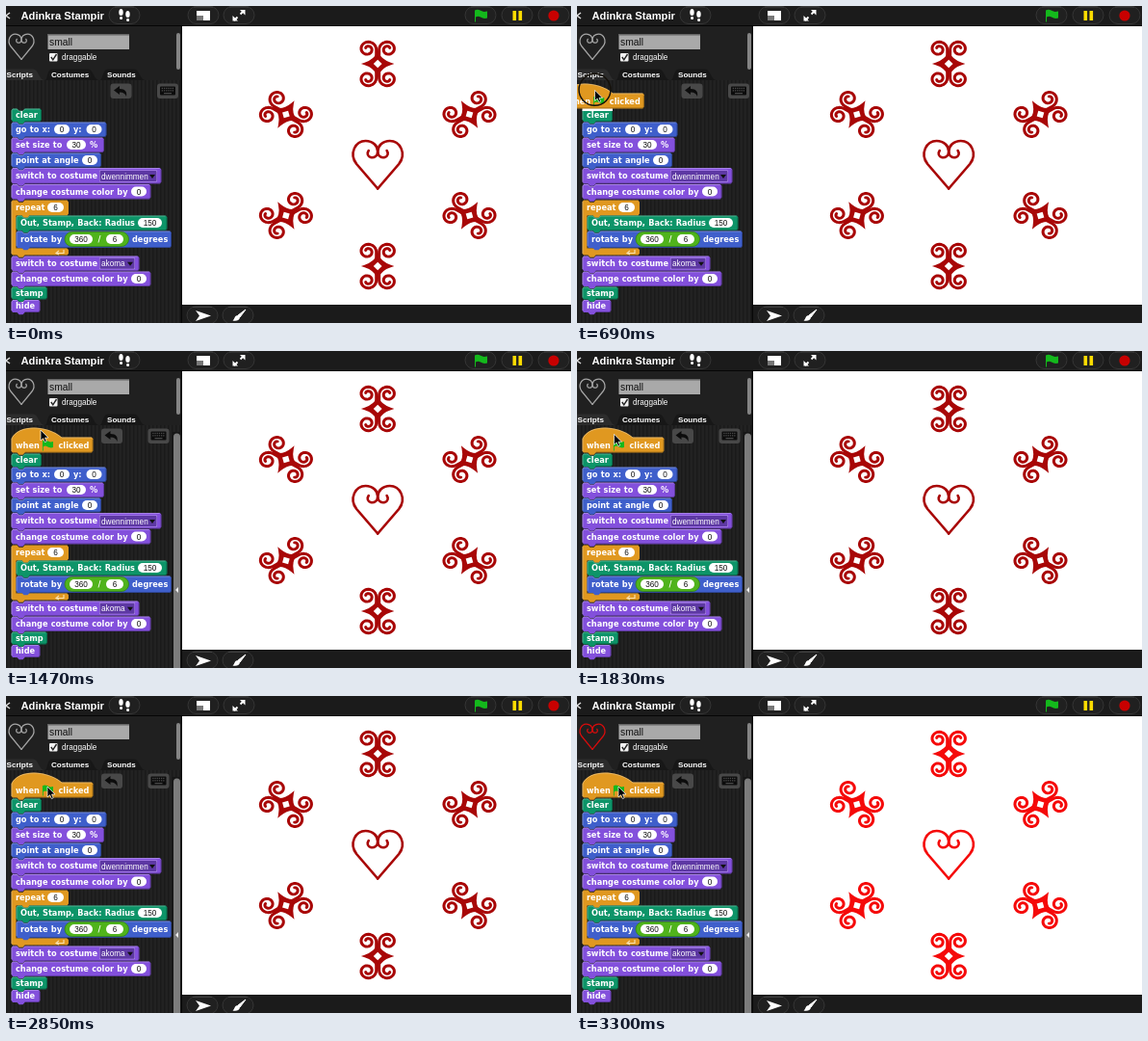
Write an HTML page that moves like this. It is 587x329 px and loops after 3.33 s.

```html
<!DOCTYPE html>
<html lang="en">
<head>
<meta charset="utf-8">
<title>Adinkra blocks</title>
<style>
html, body { margin: 0; width: 100%; height: 100%; overflow: hidden; background: #1a1a1a; }
svg { display: block; width: 587px; height: 329px; }
text { white-space: pre; }
.b { font: bold 8.2px "DejaVu Sans", sans-serif; word-spacing: .4px; fill: #fff; }
.v { font: 8.2px "Liberation Sans", sans-serif; fill: #111; }
.t { font: bold 8.1px "Liberation Sans", sans-serif; fill: #fff; }
</style>
</head>
<body>
<svg id="scene" viewBox="0 0 587 329" xmlns="http://www.w3.org/2000/svg"></svg>
<script>
const LOOP = 3330, DROP = 1140, REDRAW = 3090, ICON = 3270;
const PEN = '#0d9468', MOVE = '#3f5fcb', LOOKS = '#8350dc', CTRL = '#e09820', OP = '#50b31c';
const DARK = '#a80707', BRIGHT = '#f50a0a';

const rect = (x, y, w, h, fill, r = 0, more = '') =>
  `<rect x="${x}" y="${y}" width="${w}" height="${h}" rx="${r}" fill="${fill}" ${more}/>`;
const path = (d, fill, more = '') => `<path d="${d}" fill="${fill}" ${more}/>`;
const text = (x, y, s, cls = 'b', more = '') => `<text x="${x}" y="${y}" class="${cls}" ${more}>${s}</text>`;
const group = (body, attrs) => `<g ${attrs}>${body}</g>`;

// Block parts
const bump = (x, y) => `H${x + 14} l-2 2.2 h-4 l-2 -2.2`;
const notch = x => `H${x + 6} l2 2.2 h4 l2 -2.2`;
function shape(x, y, r, b, color) {
  const d = `M${x} ${y + 2} L${x + 1.5} ${y} ${notch(x)} H${r - 1.5} L${r} ${y + 2} V${b - 2} L${r - 1.5} ${b} ${bump(x, b)} H${x + 1.5} L${x} ${b - 2}Z`;
  return path(d, color) +
    path(`M${x + .5} ${b - 2} V${y + 2} L${x + 1.5} ${y + .5} ${notch(x)} H${r - 2}`, 'none', 'stroke="#fff" stroke-opacity=".28"') +
    path(`M${r - .5} ${y + 2} V${b - 2} L${r - 1.5} ${b - .5} H${x + 14}`, 'none', 'stroke="#000" stroke-opacity=".28"');
}
const slot = (x, y, w, s) => rect(x, y - 5, w, 10, '#fff', 5) +
  text(x + w / 2, y + 3, s, 'v', 'text-anchor="middle"');
const menu = (x, y, w, s) => rect(x, y - 6, w, 12, '#b795ec', 1) + rect(x + .5, y - 5.5, w - 1, 11, '#5d38a3', 1) +
  text(x + 2, y + 3, s, 'v', 'style="fill:#fff"') + path(`M${x + w - 8} ${y - 1.5} h6 l-3 4z`, '#111');
const block = (y, b, r, color, label, extra = '', x = 5.5) =>
  shape(x, y, r, b, color) + text(x + 4.5, (y + b) / 2 + 2.9, label) + extra;

function script() {
  const c = 'M5.5 203 L7 201.5 ' + notch(5.5) + ' H63.5 L65 203.5 V215.5 L63.5 217.5 ' + bump(10.5, 217.5) +
    ' H10.5 V251.5 H63.5 L65 253 V257 L63.5 258.5 ' + bump(5.5, 258.5) + ' H7 L5.5 257Z';
  return block(106.5, 120, 37, PEN, 'clear') +
    block(120.5, 136, 104.5, MOVE, 'go to x:', slot(50, 128, 16, 0) + text(70, 131, 'y:') + slot(83.5, 128, 16, 0)) +
    block(136.5, 152, 102, LOOKS, 'set size to', slot(63, 144, 20, 30) + text(87, 147, '%')) +
    block(152.5, 167.5, 99, MOVE, 'point at angle', slot(79, 160, 16, 0)) +
    block(168, 184.5, 161.5, LOOKS, 'switch to costume', menu(97, 176.5, 60, 'dwennimmen')) +
    block(185, 200.5, 150.5, LOOKS, 'change costume color by', slot(130, 192.5, 16, 0)) +
    path(c, CTRL) + path('M6 257 V203 M11 251 H63', 'none', 'stroke="#fff" stroke-opacity=".25"') +
    text(10, 212, 'repeat') + slot(43, 209, 17, 6) +
    path('M53 256.5 H60 V253 M55 254 L52 256.5 L55 258', 'none', 'stroke="#f6dfae" stroke-width="1.2"') +
    block(217.5, 233, 167.5, PEN, 'Out, Stamp, Back: Radius', slot(137, 225, 25, 150), 10.5) +
    block(233.5, 251, 172, MOVE, 'rotate by', rect(61, 234.5, 66.5, 15, OP, 7.5, 'stroke="#338512" stroke-width=".8"') +
      slot(66, 242, 24, 360) + text(95.5, 245, '/') + slot(104, 242, 18, 6) + text(131, 245, 'degrees'), 10.5) +
    block(259.5, 275, 138.5, LOOKS, 'switch to costume', menu(97, 267.3, 37, 'akoma')) +
    block(275.5, 291, 150.5, LOOKS, 'change costume color by', slot(130, 283, 16, 0)) +
    block(291.5, 304.5, 43, PEN, 'stamp') +
    block(305, 318, 35.5, LOOKS, 'hide');
}

const flag = (x, y, k) => path('M-6 -5 C-3 -7 0 -5 2 -4 S5 -4 7 -4 V3 C4 4 2 3 0 2 S-3 1 -5 2 V7 H-6Z', '#14b81c',
  `transform="translate(${x} ${y}) scale(${k})"`);

function hat() {
  const d = 'M5.5 91 C12 76 42 76 58 89.5 H89 L90.5 91 V103.5 L89 105.5 ' + bump(5.5, 105.5) + ' H7 L5.5 104Z';
  return path(d, CTRL) + path('M6 104 V91 C12.5 76.5 42 76.5 58 90 H89', 'none', 'stroke="#fff" stroke-opacity=".3"') +
    path('M90 92 V103.5 L89 105 H20', 'none', 'stroke="#000" stroke-opacity=".25"') +
    text(10, 101, 'when') + flag(43, 97.5, .85) + text(54.5, 101, 'clicked');
}

// Stamps
function horn() {
  let d = 'M-1.4 -3';
  for (let i = 0; i <= 36; i++) {
    const p = i / 36, a = p * 1.4 * 2 * Math.PI, r = 8.6 - 6.2 * p;
    d += ` L${(-10 + r * Math.cos(a)).toFixed(2)} ${(-15.2 - r * Math.sin(a)).toFixed(2)}`;
  }
  return d;
}
function ram() {
  const arm = horn();
  let s = '';
  for (const sx of [1, -1]) for (const sy of [1, -1])
    s += path(arm, 'none', `transform="scale(${sx} ${sy})" stroke-width="2.9" stroke-linecap="round" stroke-linejoin="round"`);
  return s + path('M0 -11 Q2.5 -3.5 12.5 0 Q2.5 3.5 0 11 Q-2.5 3.5 -12.5 0 Q-2.5 -3.5 0 -11Z', 'currentColor', 'stroke-width="2.6"') +
    path('M0 -4.2 L4.2 0 L0 4.2 L-4.2 0Z', '#fff', 'stroke="none"');
}
const heart = w => [1, -1].map(s => path(
  'M0 24.5 L-21 -1 C-29 -12 -22 -25 -12 -25 C-5 -25 0 -20 0 -14 C0 -9 -4 -7 -7 -8 C-10 -9 -11 -12 -9 -15',
  'none', `transform="scale(${s} 1)" stroke-width="${w}" stroke-linejoin="round" stroke-linecap="round"`)).join('');

function stage() {
  let s = group(heart(2.5), '');
  for (let i = 0; i < 6; i++) s += group(ram(), `transform="rotate(${60 * i}) translate(0 -105)"`);
  return rect(183, 21, 404, 289, '#fff') +
    group(s, `id="stamps" transform="translate(386.2 165) scale(1.048 1)" stroke="currentColor"`);
}

// Surrounding window
const pill = (x, y, w = 32) => rect(x - w / 2, y - 9, w, 18, '#202020', 9, 'stroke="#3b3b3b" stroke-width=".8"') +
  path(`M${x - w / 2 + 6} ${y - 8.5} H${x + w / 2 - 6}`, 'none', 'stroke="#484848" stroke-width=".7"');
const foot = (x, y) => `<ellipse cx="${x}" cy="${y - 2}" rx="2.2" ry="3.6" fill="#fff"/>` + rect(x - 1.4, y + 2.6, 3, 3, '#fff', 1.4);

function frame() {
  return rect(0, 0, 587, 329, '#1b1b1b') + rect(0, 20, 587, 1.2, '#050505') +
    rect(0, 21, 183, 56, '#202020') + rect(0, 77, 183, 252, 'url(#stripes)') + rect(181.5, 21, 1.5, 308, '#080808') +
    path('M4 7 L0 10 L4 13', 'none', 'stroke="#ddd" stroke-width="1.5"') +
    text(15.5, 14, 'Adinkra Stampir', 't', 'style="font-size:11.2px"') +
    pill(123, 9.5) + foot(119.5, 8.5) + foot(126.5, 10.5) +
    pill(205, 9.5) + rect(198, 5, 14, 10, '#fff') + rect(198, 10, 7, 5, '#777') +
    pill(242, 9.5) + path('M243.5 8.5 L247 5 M240.5 11.5 L237 15', 'none', 'stroke="#fff" stroke-width="1.8"') +
    path('M248.5 4 v5.5 l-5.5 -5.5z M235.5 15.5 v-5.5 l5.5 5.5z', '#fff') +
    pill(493, 9.5) + flag(493, 9.5, 1) +
    pill(531, 9.5) + rect(526.5, 5, 3.6, 10, '#ffdc00') + rect(532.5, 5, 3.6, 10, '#ffdc00') +
    pill(569, 9.5) + '<circle cx="569" cy="10" r="5.6" fill="#c80000"/>' +
    pill(204, 321) + path('M197 316 L213 321.5 L197 327 L201 321.5Z', '#fff') +
    pill(241, 321) + path('M249 315 L241 321 L243 323Z', '#fff', 'stroke="#fff"') + path('M241 321 C237 321 238 325 235.5 326.5 C240 327.5 243 325.5 243 323Z', '#fff') +
    rect(43, 29.5, 85, 15.5, '#a9a9a9') + path('M43.5 45 V30 H128', 'none', 'stroke="#666"') +
    text(45, 41, 'small', 'v', 'style="font-size:10.3px"') +
    rect(45, 49, 8.5, 8.5, '#f2f2f2', 1) + path('M46.8 53 L48.8 55.8 L52.5 50', 'none', 'stroke="#222" stroke-width="1.4"') +
    text(58, 56, 'draggable', 'v', 'style="fill:#fff"') +
    rect(177, 28, 4, 38, '#858585', 2) +
    path('M0 77 V65.5 H28 C34 65.5 34 77 40 77Z', '#2c2c2c') +
    path('M40 77 C44 77 42 65.5 48 65.5 H85 C91 65.5 91 77 97 77 C101 77 100 65.5 106 65.5 H133 C139 65.5 139 77 145 77Z', '#171717') +
    text(.5, 74, 'Scripts', 't') + text(47, 74, 'Costumes', 't') + text(105, 74, 'Sounds', 't') +
    group(heart(2.4), 'id="icon" transform="translate(16 42.3) scale(.53)" stroke="currentColor"');
}

function tools() {
  let keys = '';
  for (let r = 0; r < 2; r++) for (let i = 0; i < 6; i++) keys += rect(161.7 + i * 2.2, 84.8 + r * 2.4, 1.3, 1.3, '#4a4a4a');
  return rect(108.5, 80.5, 22, 15.5, '#484848', 3) +
    path('M112 87.5 L118 83 V86 C124 86 126 89 125 94 C124 91 122 89.5 118 89.5 V92Z', '#0c0c0c') +
    rect(157, 80.5, 22, 15.5, '#484848', 3) + rect(160, 83.5, 16, 9, '#0c0c0c', 1) + keys + rect(164, 90, 8, 1.2, '#4a4a4a');
}

const svg = document.getElementById('scene');
svg.innerHTML = `<defs><pattern id="stripes" width="4" height="4" patternUnits="userSpaceOnUse">
  ${rect(0, 0, 4, 4, '#222')}${rect(0, 0, 1.6, 4, '#1a1a1a')}</pattern></defs>` +
  frame() + group(tools(), 'id="tools"') +
  group(rect(173, 84, 9, 245, '#161616') + rect(174, 85.5, 7, 250, '#7c7c7c', 3.5) + path('M179 245 v6 l-3 -3z', '#eee'), 'id="bar"') +
  script() + rect(5.5, 106, 31.5, 3, '#fff', 0, 'id="hint"') + stage() +
  group(hat(), 'id="hat"') +
  '<circle id="ring" fill="none" stroke="#15110a" stroke-width="1.5"/>' +
  path('M0 0 V11 L2.6 8.7 L4.4 12.6 L6.2 11.8 L4.5 8 H8Z', '#000', 'id="cursor" stroke="#fff" stroke-width=".7"');

const $ = id => document.getElementById(id);
const show = (id, on) => $(id).setAttribute('visibility', on ? 'visible' : 'hidden');
const place = (id, x, y) => $(id).setAttribute('transform', `translate(${x.toFixed(2)} ${y.toFixed(2)})`);

// Keys are [time, x, y], eased between neighbours
function along(keys, t) {
  if (t <= keys[0][0]) return keys[0].slice(1);
  for (let i = 1; i < keys.length; i++) {
    const [t0, x0, y0] = keys[i - 1], [t1, x1, y1] = keys[i];
    if (t < t1) {
      const p = (t - t0) / (t1 - t0), e = p * p * (3 - 2 * p);
      return [x0 + (x1 - x0) * e, y0 + (y1 - y0) * e];
    }
  }
  return keys[keys.length - 1].slice(1);
}
const hatKeys = [[270, -98, 14], [480, -37, 5], [930, -1, -4]];
const handKeys = [[270, -50, 100], [480, 4, 91], [930, 36, 83], [1200, 36, 82], [1650, 36, 82], [2100, 43, 94]];

function draw(t) {
  const dropped = t >= DROP;
  const [hx, hy] = dropped ? [0, 0] : along(hatKeys, t);
  const [cx, cy] = along(handKeys, t);
  place('hat', hx, hy);
  place('cursor', cx, cy);
  place('tools', dropped ? -9.5 : 0, 0);
  show('hat', t >= 270);
  show('cursor', t >= 270);
  show('bar', dropped);
  show('hint', t >= 620 && !dropped);
  show('ring', t >= 270 && !dropped);
  const ring = $('ring');
  ring.setAttribute('cx', cx);
  ring.setAttribute('cy', cy - .5);
  ring.setAttribute('r', 16.5);
  $('stamps').style.color = t >= REDRAW ? BRIGHT : DARK;
  $('icon').style.color = t >= ICON ? '#d80c0c' : '#a5a5a5';
}

const start = performance.now();
function tick() {
  draw((performance.now() - start) % LOOP);
  requestAnimationFrame(tick);
}
tick();
</script>
</body>
</html>
```
